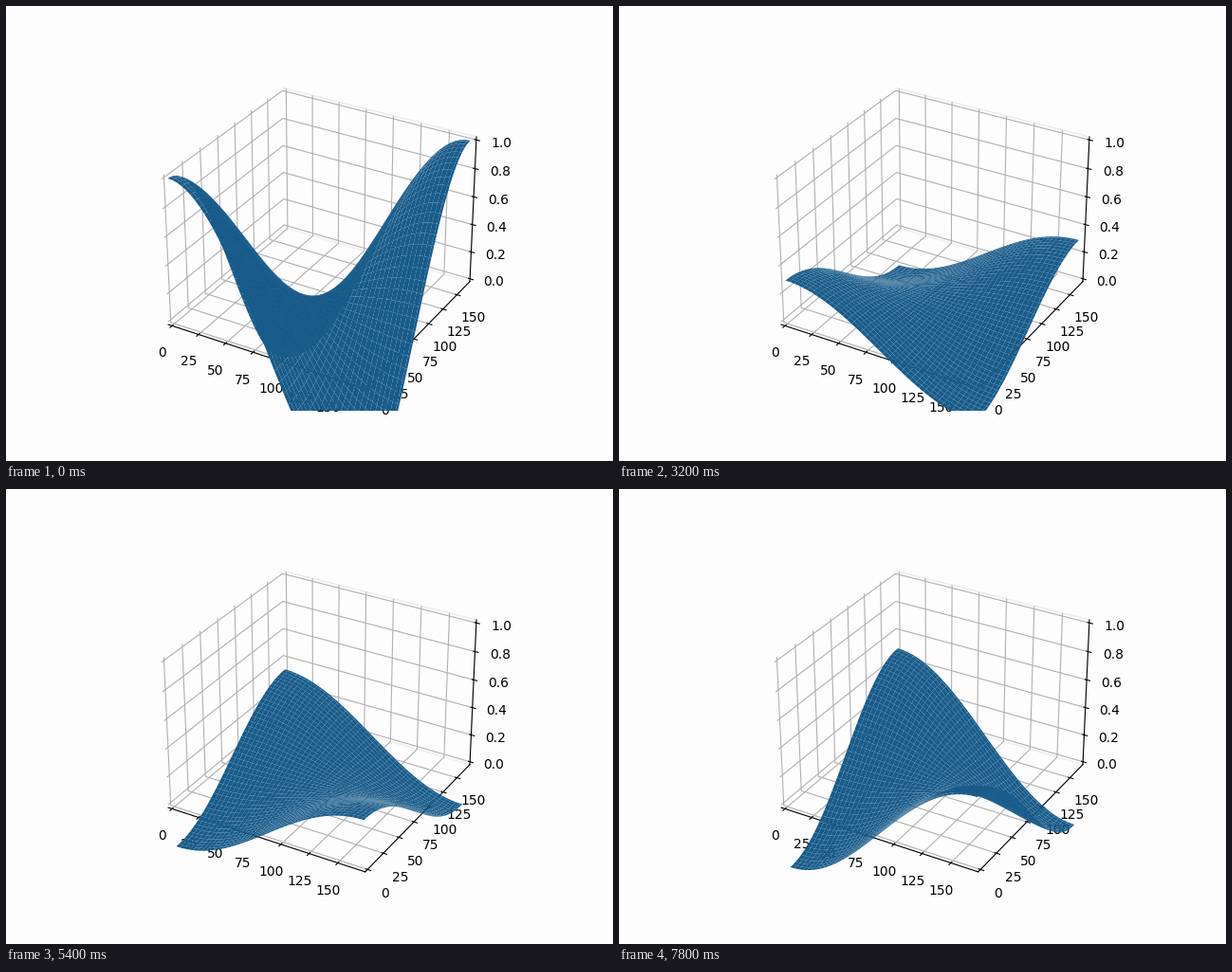
A matplotlib script for the animation above (8 s loop, 640 by 480 pixels).

```python
import numpy as np
import matplotlib.pyplot as plt
from matplotlib.animation import FuncAnimation

FRAMES, INTERVAL = 40, 200
SIZE = 170               # side of the square membrane
OMEGA, DAMP = 0.087, 0.0198
PAPER = "#fdfdfd"
BLUE = "#185b8a"

side = np.arange(SIZE + 1)
X, Y = np.meshgrid(side, side)
MODE = np.cos(np.pi * X / SIZE) * np.cos(np.pi * Y / SIZE)

fig = plt.figure(figsize=(6.4, 4.8), dpi=100, facecolor=PAPER)
ax = fig.add_subplot(projection="3d", facecolor=PAPER)


def padded(top):
    pad = top / 48
    return -pad, top + pad


def amplitude(t):
    """Damped oscillator released from rest."""
    swing = np.cos(OMEGA * t) + DAMP / OMEGA * np.sin(OMEGA * t)
    return np.exp(-DAMP * t) * swing


ax.set_xlim(*padded(SIZE))
ax.set_ylim(*padded(SIZE))
ax.set_zlim(*padded(1))
for axis, edge in ((ax.xaxis, PAPER), (ax.yaxis, "#ececec"), (ax.zaxis, "#f0f0f0")):
    axis.set_pane_color(PAPER)
    axis.pane.set_edgecolor(edge)


def update(i):
    for old in list(ax.collections):
        old.remove()
    surface = ax.plot_surface(X, Y, amplitude(i) * MODE, color=BLUE,
                              rstride=4, cstride=4, shade=False)
    return [surface]


anim = FuncAnimation(fig, update, frames=FRAMES, interval=INTERVAL,
                     repeat=True, blit=False)
plt.show()
```
